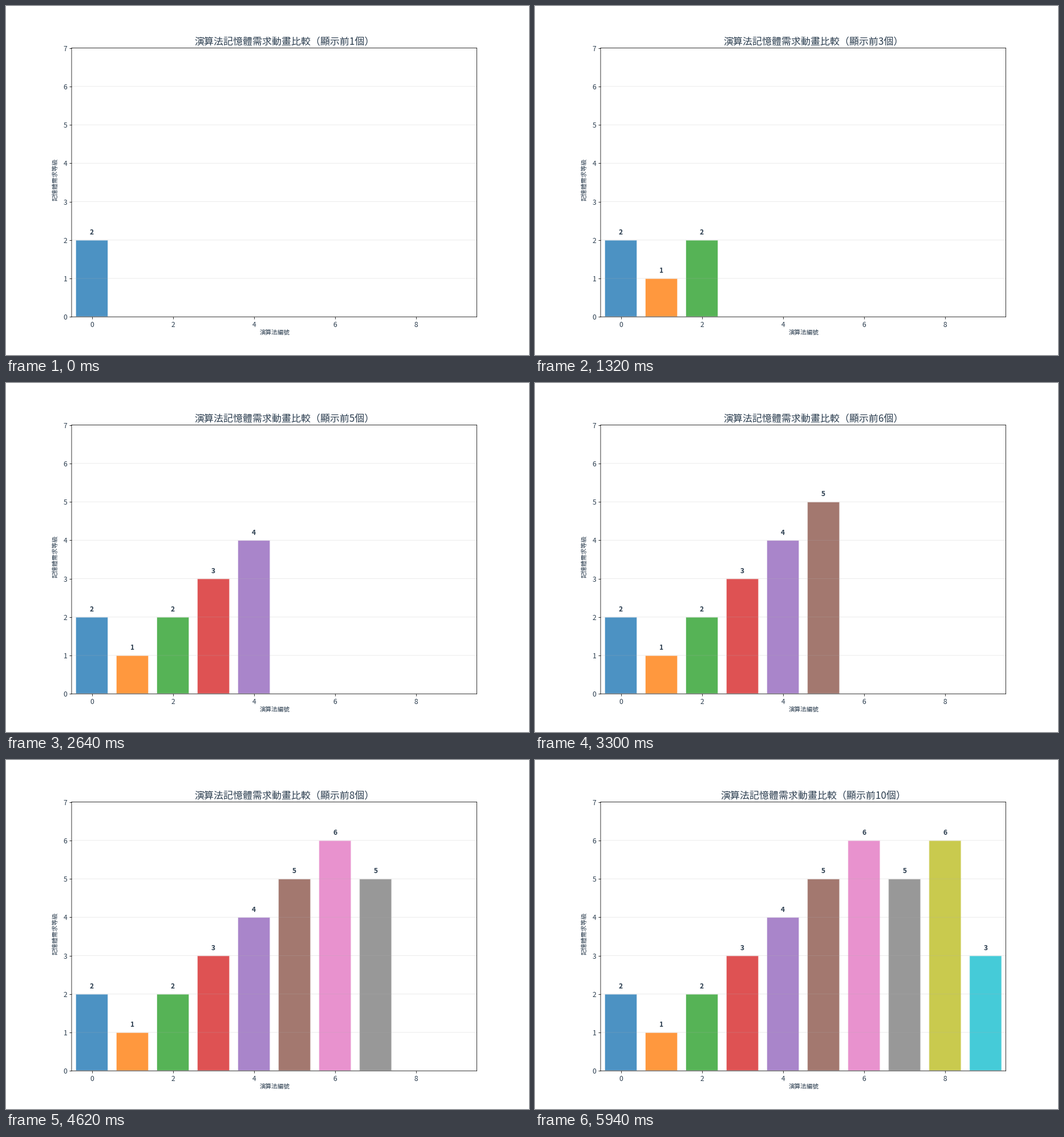
Animation of 917 by 611 pixels, one loop 6600 ms. Source, as a matplotlib script:

```python
import matplotlib.pyplot as plt
from matplotlib.animation import FuncAnimation

W, H, DPI = 917, 611, 64
INK = "#2c3e50"
LEVELS = [2, 1, 2, 3, 4, 5, 6, 5, 6, 3]
COUNT = len(LEVELS)
LINE = 0.8


def px(n):
    """Convert pixels to points."""
    return n * 72 / DPI


plt.rcParams["font.family"] = "Noto Sans CJK JP"
plt.rcParams["path.snap"] = False

fig = plt.figure(figsize=(W / DPI, H / DPI), dpi=DPI, facecolor="white")
left, right, top, bottom = 115, 825.5, 73.6, 544.2
ax = fig.add_axes([left / W, 1 - bottom / H,
                   (right - left) / W, (bottom - top) / H])
ax.set_xlim(-0.5, COUNT - 0.5)
ax.set_ylim(0, 7)
ax.set_xticks(range(0, COUNT, 2))
ax.set_yticks(range(8))
ax.tick_params(length=px(3.7), width=px(LINE), pad=px(3.7),
               labelsize=px(12.2), labelcolor=INK)
ax.grid(axis="y", color="#b0b0b0", alpha=0.3, linewidth=px(LINE))
for spine in ax.spines.values():
    spine.set_linewidth(px(LINE))


def label(x, y, text, size, **kw):
    return fig.text(x / W, 1 - y / H, text, fontsize=px(size), color=INK,
                    ha="center", **kw)


title = label(488, 68, "", 17, va="baseline")
label(470.8, 572, "演算法編號", 10.6, va="center")
label(86.3, 304, "記憶體需求等級", 10.6, va="center", rotation=90)

bars = ax.bar(range(COUNT), LEVELS, width=0.8, alpha=0.8, edgecolor="white",
              linewidth=px(1.6), color=[f"C{i}" for i in range(COUNT)])
values = [ax.text(i, v + 0.145, str(v), ha="center", va="baseline",
                  fontsize=px(12.2), color=INK, weight="bold")
          for i, v in enumerate(LEVELS)]


def update(frame):
    shown = frame + 1
    title.set_text(f"演算法記憶體需求動畫比較（顯示前{shown}個）")
    for i, (bar, value) in enumerate(zip(bars, values)):
        bar.set_visible(i < shown)
        value.set_visible(i < shown)
    return [title, *bars, *values]


anim = FuncAnimation(fig, update, frames=COUNT, init_func=lambda: update(0),
                     interval=660, repeat=True, repeat_delay=0, blit=False)
plt.show()
```
